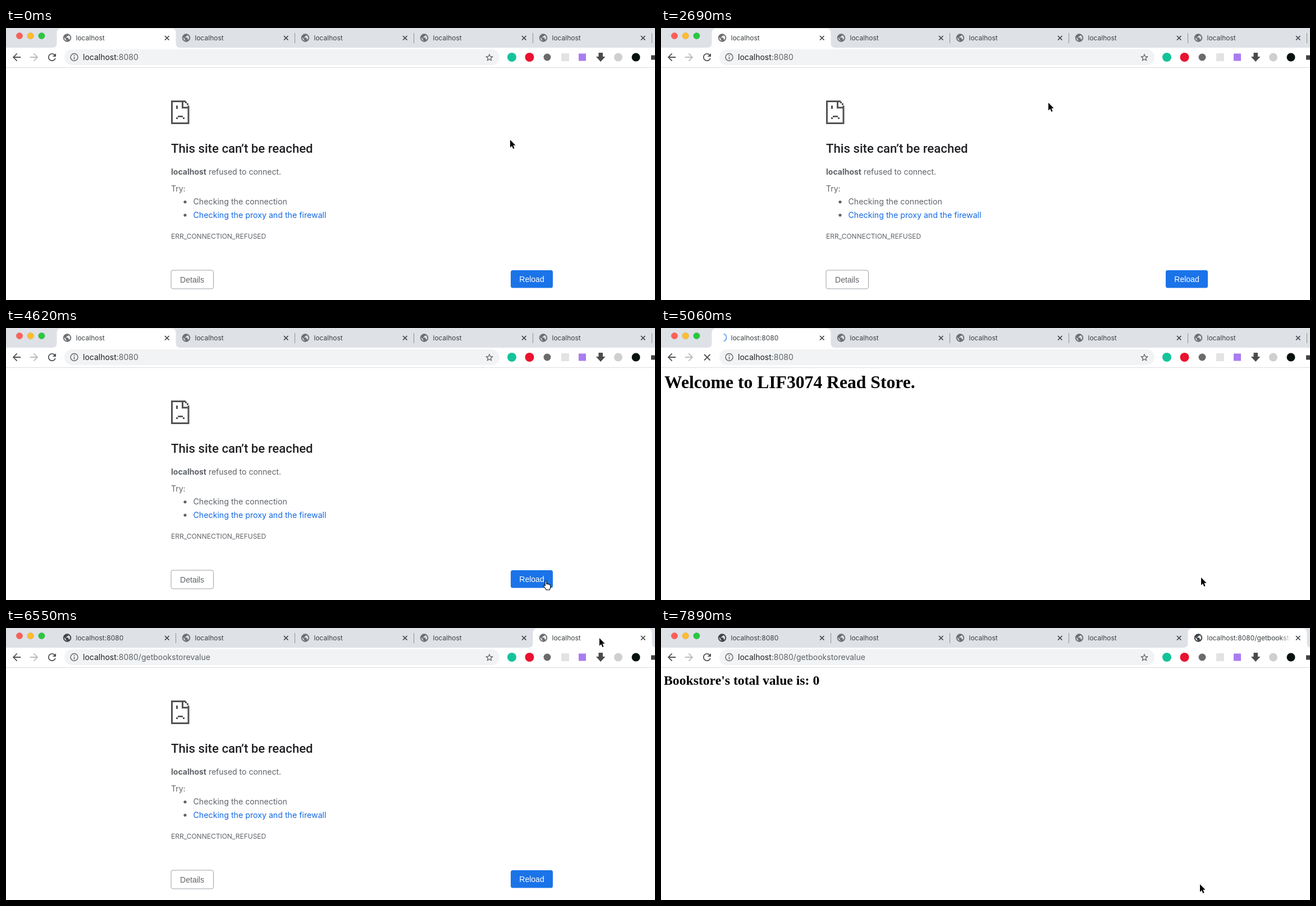
An HTML page that plays this animation: 1156 px wide and 484 px high, repeating every 8000 ms.

```html
<!DOCTYPE html>
<html lang="en">
<head>
<meta charset="utf-8">
<title>localhost:8080</title>
<style>
  html, body { margin: 0; width: 100%; height: 100%; overflow: hidden; background: #fff; }
  svg { display: block; }
  text { font-family: Inter, sans-serif; white-space: pre; }
  .body { font-size: 14px; fill: #5f6368; }
  .item { font-size: 14.2px; }
  .serif { font-family: "Liberation Serif", serif; font-weight: bold; }
  .button { font: 14px "Liberation Sans", sans-serif; text-anchor: middle; }
</style>
</head>
<body>
<svg width="1156" height="484" viewBox="0 0 1156 484">
  <defs>
    <linearGradient id="fade">
      <stop stop-color="#fff" stop-opacity="0"/><stop offset="1" stop-color="#fff"/>
    </linearGradient>
    <radialGradient id="glow">
      <stop stop-color="#eef0f2"/><stop offset="1" stop-color="#eef0f2" stop-opacity="0"/>
    </radialGradient>
    <path id="globe" transform="scale(.69) translate(-12 -12)" fill="currentColor" stroke="currentColor" d="M12 2C6.48 2 2 6.48 2 12s4.48 10 10 10 10-4.48 10-10S17.52 2 12 2zm-1 17.93c-3.95-.49-7-3.85-7-7.93 0-.62.08-1.21.21-1.79L9 15v1c0 1.1.9 2 2 2v1.93zm6.9-2.54c-.26-.81-1-1.39-1.9-1.39h-1v-3c0-.55-.45-1-1-1H8v-2h2c.55 0 1-.45 1-1V7h2c1.1 0 2-.9 2-2v-.41c2.93 1.19 5 4.06 5 7.41 0 2.08-.8 3.97-2.1 5.39z"/>
    <path id="back" transform="scale(.9) translate(-12 -12)" d="M20 11H7.83l5.59-5.59L12 4l-8 8 8 8 1.41-1.41L7.83 13H20z"/>
  </defs>

  <rect width="1156" height="35" fill="#dee1e6"/>
  <g id="tabs"></g>
  <g stroke="#000" stroke-opacity=".12" stroke-width=".8">
    <circle cx="24" cy="14" r="5.8" fill="#ff5f57"/>
    <circle cx="43.7" cy="14" r="5.8" fill="#febc2e"/>
    <circle cx="63.4" cy="14" r="5.8" fill="#28c840"/>
  </g>

  <!-- toolbar -->
  <rect y="70" width="1156" height="1" fill="#dadce0"/>
  <use href="#back" x="19" y="52" fill="#4f5357"/>
  <use href="#back" transform="translate(50 52) scale(-1 1)" fill="#b9bbbe"/>
  <path id="reload" fill="#4f5357" transform="translate(82 52) scale(.88) translate(-12 -12)" d="M17.65 6.35C16.2 4.9 14.21 4 12 4c-4.42 0-7.99 3.58-7.99 8s3.57 8 7.99 8c3.73 0 6.84-2.55 7.73-6h-2.08c-.82 2.33-3.04 4-5.65 4-3.31 0-6-2.69-6-6s2.69-6 6-6c1.66 0 3.14.69 4.22 1.78L13 11h7V4z"/>
  <path id="stop" d="M77 47l10.5 10.5m0-10.5l-10.5 10.5" stroke="#4f5357" stroke-width="1.8"/>
  <rect x="104" y="38" width="775" height="28" rx="14" fill="#f1f3f4"/>
  <circle cx="121.5" cy="52" r="6.5" fill="none" stroke="#5f6368" stroke-width="1.4"/>
  <path d="M121.5 48v1.7m0 1.5v4.5" stroke="#5f6368" stroke-width="1.5"/>
  <text x="137" y="57" font-size="14" fill="#202124">localhost<tspan id="path" fill="#5f6368"></tspan></text>
  <path fill="#4f5357" transform="translate(861 52.5) scale(.7) translate(-12 -12)" d="M22 9.24l-7.19-.62L12 2 9.19 8.63 2 9.24l5.46 4.73L5.82 21 12 17.27 18.18 21l-1.63-7.03zM12 15.4l-3.76 2.27 1-4.28-3.32-2.88 4.38-.38L12 6.1l1.71 4.04 4.38.38-3.32 2.88 1 4.28z"/>
  <circle cx="901" cy="52" r="8" fill="#15c39a"/>
  <circle cx="932.5" cy="52" r="8" fill="#e9122f"/>
  <circle cx="964" cy="52" r="6.5" fill="#6b6b6b"/>
  <rect x="989" y="45" width="14" height="14" fill="#e3e3e3"/>
  <rect x="1020" y="45.5" width="13" height="13" fill="#a97cf0"/>
  <path d="M1055.5 44h7.5v7h4.5l-8.3 9-8.2-9h4.5z" fill="#4b4b4b"/>
  <circle cx="1090.5" cy="52" r="7.5" fill="#cfcfcf"/>
  <circle cx="1122" cy="52" r="7.5" fill="#07120f"/>
  <rect x="1149" y="48.5" width="8" height="8" fill="#444"/>

  <g id="error">
    <g fill="#535353">
      <path d="M320 130.5H295.5V169.5H325V138M314.5 130V141.8H326.5" fill="none" stroke="#535353" stroke-width="3"/>
      <path d="M319 131h3v3h-3zM322 134h3v3h-3zM303 138h3v6h-3zM306 156h9v2.7h-9zM303 159h3v3h-3zM315 159h3v3h-3z"/>
    </g>
    <text x="294" y="222" style="font:500 22.2px Roboto,sans-serif" fill="#202124">This site can’t be reached</text>
    <text class="body" x="294" y="261"><tspan font-weight="700">localhost</tspan> refused to connect.</text>
    <text class="body" x="294" y="290.5">Try:</text>
    <circle cx="319" cy="309.5" r="2.6" fill="#5f6368"/>
    <text class="body item" x="333.5" y="314">Checking the connection</text>
    <circle cx="319" cy="333" r="2.6" fill="#5f6368"/>
    <text class="body item" x="333.5" y="338" style="fill:#1268e6">Checking the proxy and the firewall</text>
    <text class="body" x="294" y="374.5" style="font-size:12px">ERR_CONNECTION_REFUSED</text>
    <rect x="294" y="431" width="75.5" height="33" rx="3.5" fill="#fff" stroke="#9aa0a6"/>
    <text class="button" x="331.5" y="452.5" fill="#5f6368">Details</text>
    <rect x="899" y="431" width="75" height="31.5" rx="3.5" fill="#1a73e8"/>
    <text class="button" x="936.5" y="451.5" fill="#fff">Reload</text>
  </g>
  <text id="welcome" class="serif" x="6" y="107" font-size="31.65">Welcome to LIF3074 Read Store.</text>
  <text id="value" class="serif" x="5" y="101" font-size="23.7">Bookstore's total value is: 0</text>

  <g id="arrow">
    <path transform="scale(.94)" d="M0 0V14.5L3.3 11.4 5.7 17 8 16 5.7 10.5H10.2Z" stroke="#fff" stroke-width="1.6" paint-order="stroke"/>
  </g>
  <path id="hand" fill="#fff" stroke="#000" stroke-width="1.1" stroke-linejoin="round" d="M3.2 9.8V2.2Q3.2.8 4.5.8T5.8 2.2V6.5Q7.5 5.4 8.6 7 10 6.2 10.9 7.8 12.8 7.2 12.8 9.5V12Q12.8 14 11.3 17H5.2Q4.5 15 1 11 .2 9.2 1.6 8.8 2.5 8.8 3.2 9.8Z"/>
</svg>

<script>
const LOOP = 8000;
const $ = id => document.getElementById(id);

// time, x, y, shape ('' hides the pointer)
const pointer = [
  [0, 898, 199, 'arrow'], [150, 912, 190, 'arrow'], [300, 610, 131, 'arrow'],
  [600, 614, 136, 'arrow'], [750, 620, 138, 'arrow'], [890, 626, 136, 'arrow'], [1040, 629, 136, 'arrow'],
  [1340, 629, 135, 'arrow'], [1490, 628, 134, 'arrow'], [2690, 690, 133, 'arrow'], [2840, 0, 0, ''],
  [3880, 1048, 330, 'arrow'], [4030, 1010, 395, 'arrow'], [4170, 966, 442, 'hand'], [4320, 956, 449, 'hand'],
  [4620, 957, 449, 'hand'], [4910, 962, 444, 'arrow'], [5350, 990, 420, 'arrow'], [5500, 1103, 330, 'arrow'],
  [5950, 1098, 240, 'arrow'], [6100, 1075, 110, 'arrow'], [6250, 1060, 30, 'arrow'], [6400, 1057, 18, 'arrow'],
  [6700, 1015, 200, 'arrow'], [6850, 956, 446, 'hand'], [7000, 957, 449, 'hand'], [7300, 962, 455, 'arrow'],
  [7450, 961, 465, 'arrow'], [7590, 960, 460, 'arrow'], [7740, 960, 457, 'arrow'], [7890, 960, 456, 'arrow'],
];

// time, active tab, page, loading
const scenes = [
  [0, 0, 'error', false], [4770, 0, 'error', true], [4910, 0, 'welcome', true], [5200, 0, 'welcome', false],
  [6550, 4, 'error', false], [7150, 4, 'error', true], [7300, 4, 'value', true], [7590, 4, 'value', false],
];

const latest = (list, t) => list.findLast(entry => entry[0] <= t);
const show = (id, on) => $(id).style.display = on ? '' : 'none';

function tabShape(x) {
  const r = x + 212;
  return `M${x - 8} 35Q${x} 35 ${x} 27V9Q${x} 1 ${x + 8} 1H${r - 8}Q${r} 1 ${r} 9V27Q${r} 35 ${r + 8} 35Z`;
}

function tab(i, { active, hovered, loading, loaded, title, angle }) {
  const x = 90.5 + 212 * i, current = i === active;
  let out = '';
  if (current) out += `<path d="${tabShape(x)}" fill="#fff"/>`;
  else if (i === hovered) out += `<path d="${tabShape(x)}" fill="#e6e8ec"/>
    <ellipse cx="1058" cy="18" rx="46" ry="17" fill="url(#glow)"/>`;
  else if (i + 1 !== active) out += `<path d="M${x + 212} 9V27" stroke="#8d9196"/>`;
  out += current && loading
    ? `<path d="M2.3-6.6A7 7 0 0 1 2.3 6.6" transform="translate(${x + 19} 17) rotate(${angle})"
        fill="none" stroke="#6aa4f0" stroke-width="1.9"/>`
    : `<use href="#globe" x="${x + 18.5}" y="17.5" color="${loaded ? '#3f4348' : '#6d6f72'}"/>`;
  out += `<svg x="${x + 34}" width="148" height="35"><text y="22" font-size="12" fill="#3c4043">${title}</text></svg>`;
  if (title.length > 20) out += `<rect x="${x + 166}" y="8" width="17" height="20" fill="url(#fade)"/>`;
  return out + `<path d="M${x + 192.5} 14l7.5 7.5m0-7.5l-7.5 7.5" stroke="#3f4348" stroke-width="1.7"/>`;
}

let lastKey;
function render(t) {
  const [, x, y, shape] = latest(pointer, t);
  const [, active, page, loading] = latest(scenes, t);
  const tick = Math.floor((t - 5060) / 146);
  const hovered = t >= 6250 && t < 6550 ? 4 : -1;

  show('arrow', shape === 'arrow');
  show('hand', shape === 'hand');
  if (shape) $(shape).setAttribute('transform', `translate(${x} ${y})`);

  const key = [active, page, loading, hovered, loading && tick].join();
  if (key === lastKey) return;
  lastKey = key;
  for (const id of ['error', 'welcome', 'value']) show(id, id === page);
  show('reload', !loading);
  show('stop', loading);
  const path = active ? ':8080/getbookstorevalue' : ':8080';
  $('path').textContent = path;
  $('tabs').innerHTML = [0, 1, 2, 3, 4].map(i => {
    const loaded = i === 0 ? t >= 4910 : i === 4 && page === 'value';
    const title = 'localhost' + (loaded ? (i ? path : ':8080') : '');
    return tab(i, { active, hovered, loading, loaded, title, angle: tick * 80 });
  }).join('');
}

function frame() {
  render(performance.now() % LOOP);
  requestAnimationFrame(frame);
}
frame();
</script>
</body>
</html>
```
